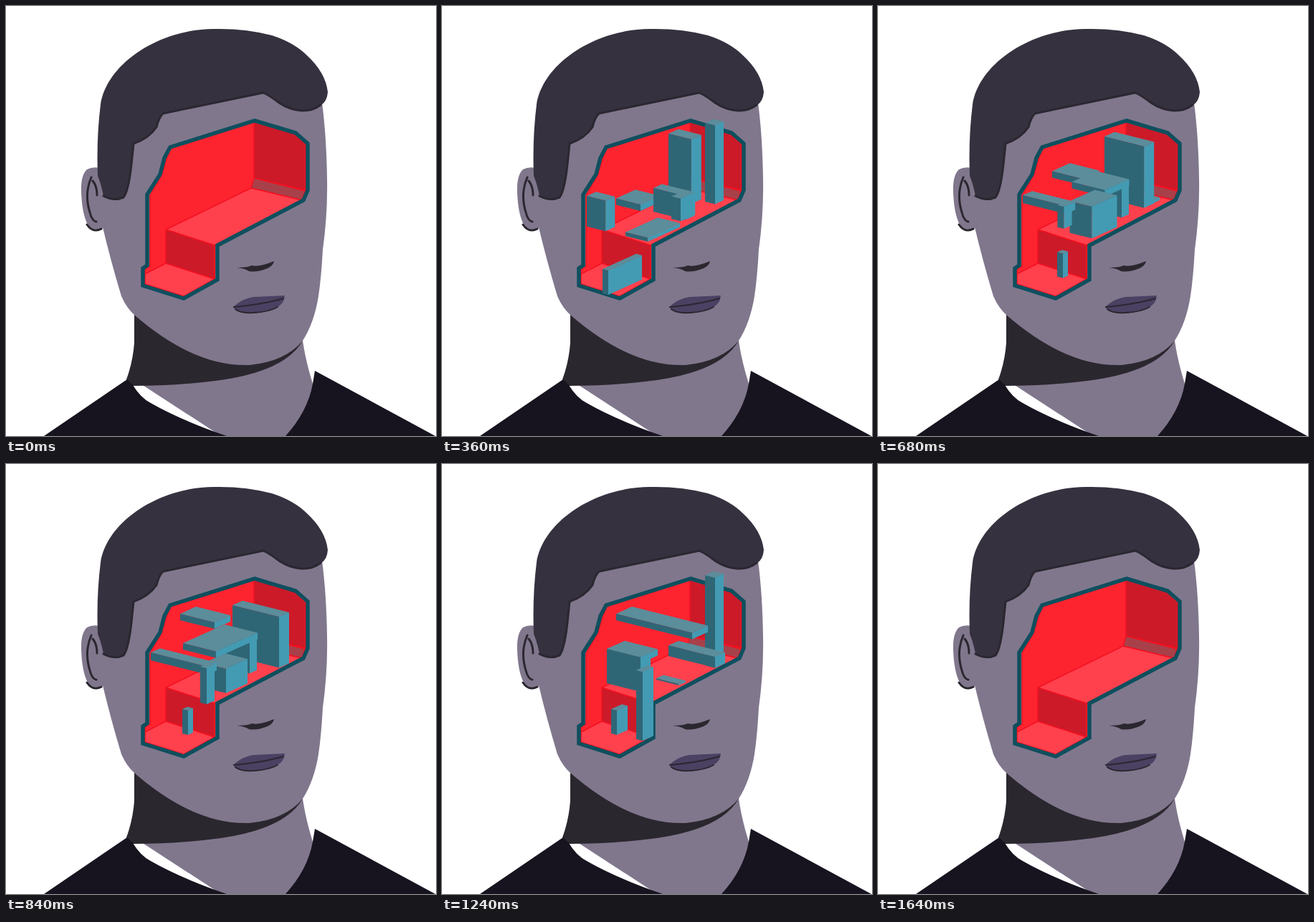
An HTML page for the animation above (1680 ms loop, 600 px wide and 600 px high).

```html
<!DOCTYPE html>
<html lang="en">
<head>
<meta charset="utf-8">
<title>Room in a head</title>
<style>
html, body { margin: 0; width: 100%; height: 100%; overflow: hidden; background: #fff }
svg { display: block; width: 100vw; height: 100vh }
.skin { fill: #80778d }
.dark { fill: #2b272e }
.shirt { fill: #17131f }
.line { fill: none; stroke: #2b2730; stroke-width: 3; stroke-linecap: round; stroke-linejoin: round }
.room { stroke: #f4101f; stroke-width: 1.5; stroke-linejoin: round }
</style>
</head>
<body>
<svg viewBox="0 0 600 600">
  <!-- neck and shirt -->
  <path class="skin" d="M190 430 414 467Q418 495 428 527L431 600H300L180 522Z"/>
  <path class="dark" d="M179 425V470Q177 497 168 521L177 530Q240 530 300 522Q390 509 414 467Z"/>
  <path class="shirt" d="M53 600 169 521 177 529Q188 547 202 554Q244 578 308 600Z"/>
  <path class="shirt" d="M390 600Q421 566 428 527L431 509 599 600Z"/>
  <!-- head -->
  <path class="skin" d="M135 227Q122 223 113 228Q104 236 105 260Q106 288 113 303Q121 316 135 310Z"/>
  <path class="line" d="M113 305Q121 317 133 311M119 239Q109 262 117 288Q120 300 126 301M121 244Q127 251 127 264"/>
  <path class="skin" d="M128 230 135 309Q146 355 161 405Q168 421 179 431Q263 504 340 501Q390 496 414 467Q430 442 436 405Q440 378 442 340Q449 290 448 240Q447 180 441 135L360 110 200 140Z"/>
  <path fill="#36313f" d="M128 237Q126 185 132 137C142 77 218 32 290 32Q334 31 371 41Q402 51 420 69Q446 93 449 120Q448 133 440 138Q427 148 412 147Q396 146 381 136Q368 126 359 121L219 150Q213 156 210 169Q199 185 178 192L175 221Q171 258 164 268Q150 274 136 265Q133 249 128 237Z"/>
  <path class="line" d="M439 138Q427 147 412 146Q396 145 381 135Q368 125 359 121L219 150Q213 156 210 169Q199 185 178 192L175 221Q171 258 164 267Q150 273 136 265"/>
  <path class="dark" d="M322 365Q338 365 343 362Q352 365 374 356Q373 362 365 366Q350 372 339 370Q333 366 322 365Z"/>
  <path fill="#4a4163" d="M317 420Q330 408 345 406L389 404Q388 416 378 420Q360 429 340 429Q322 428 317 420Z"/>
  <path class="line" style="stroke-width:2" d="M318 420Q360 416 387 408M320 423Q327 429 345 428Q367 427 379 420"/>
  <!-- room -->
  <g class="room">
    <path fill="#fd2430" d="M346 162 403 179 418 193V257L413 271 291 333V381L248 405 194 388V367L201 363V264L217 236 229 199Z"/>
    <path fill="#cc1a29" d="M346 162 403 179 418 193V257L346 240Z"/>
    <path fill="#a8404a" d="M346 240 417 258 413 271 342 254Z"/>
    <path fill="#ff404d" d="M223 312 342 254 413 271 291 334Z"/>
    <path fill="#cc1a29" d="M223 312 291 334V381L223 359Z"/>
    <path fill="#ff404d" d="M194 374 223 359 291 381 248 405 194 388Z"/>
  </g>
  <path fill="none" stroke="#0f4f5e" stroke-width="5.5" d="M347 160 404 177 421 192V257L415 271 295 334V382L248 408 191 390V366L197 362V263L215 235 221 212 229 197Z"/>
  <g id="boxes"></g>
</svg>
<script>
const LOOP = 1680;
const BEAT = 560;
const STEPS = [0, 80, 120, 160, 200, 240, 320, 400, 480];
const layer = document.getElementById('boxes');

// The motion is held on an uneven beat that repeats three times per loop.
function held(time) {
  if (time < 40) return 0;
  const beat = (time - 40) % BEAT;
  return time - beat + STEPS.findLast(step => step <= beat);
}

const face = (fill, ...points) => `<polygon fill="${fill}" points="${points.join(' ')}"/>`;

// x, y: left top corner; a: depth down-right; b: width up-right; h: height.
function box(x, y, a, b, h) {
  if (h < 0.5) return '';
  const at = (i, j, down) => [x + a * i + b * j, y + a * i * 0.25 - b * j * 0.45 + h * down];
  return face('#5b8d9b', at(0, 0, 0), at(1, 0, 0), at(1, 1, 0), at(0, 1, 0)) +
    face('#2f6676', at(0, 0, 0), at(1, 0, 0), at(1, 0, 1), at(0, 0, 1)) +
    face('#439bb3', at(1, 0, 0), at(1, 1, 0), at(1, 1, 1), at(1, 0, 1));
}

const standing = (x, foot, a, b, h) => box(x, foot - h, a, b, h);

function scene(t) {
  const ramp = (start, end, power = 1) =>
    Math.min(1, Math.max(0, (t - start) / (end - start))) ** power;
  const pop = ramp(0, 120);
  const early = ramp(120, 520);
  const middle = ramp(520, 840);
  const late = ramp(840, 1240);
  const stay = 1 - ramp(1240, 1640);
  const gone = 1 - stay;
  const pulse = Math.sin(2 * Math.PI * t / LOOP) ** 6;
  const swell = Math.sin(Math.PI * ramp(120, 600)) ** 3;

  const pillar = standing(367, 273 + 8 * late, 14, 12, 128 * pulse * stay);
  const tower = standing(316, 268, 65 * ramp(120, 840, 0.65), 14,
    (90 * pop - 75 * ramp(600, 1240, 1.4)) * stay);
  const bar = box(243 + 106 * gone, 298 - 89 * ramp(0, 840, 1.3) + 26 * gone,
    (34 + 14 * middle + 58 * late) * stay, 27 - 5 * middle, 9 * pop * stay);
  const wall = standing(295 + 4 * late, 287 - 6 * middle + 20 * late, 45 - 14 * late,
    15 - 5 * early, (46 * ramp(0, 500) - 44 * late) * stay);
  const arm = standing(296 + 40 * early, 312 - 25 * early, 13, 43 - 38 * early,
    early < 1 ? 9 * pop + 37 * early : 0);
  const table = box(294 - 47 * middle - 17 * late, 241 + 9 * middle + 8 * late + 48 * gone,
    46, 10 + 48 * middle - 33 * late, 9 * ramp(520, 560) * stay);
  const block = standing(252 + 7 * early + 17 * middle, 321 - 9 * middle, 31,
    45 - 15 * ramp(360, 840), 49 * (ramp(280, 520, 2) - ramp(520, 1200, 1.6)));
  const body = standing(230, 306, 47, 14, 48 * late * stay);
  const shelf = box(202 + 69 * late, 356 - 91 * pop - 2 * middle + 25 * late,
    7 + 72 * ramp(120, 840, 1.2) - 71 * late, 13, (90 * pop - 79 * early) * stay);
  const legHeight = 11 * ramp(520, 560) + 39 * middle + 46 * late;
  const leg = standing(230 + 41 * middle, 284 + 49 * middle + 51 * late, 9, 11 + 4 * late,
    legHeight * stay);
  const stool = standing(264 - 28 * ramp(120, 1240) - 34 * swell, 379 - 3 * middle + 22 * swell,
    8, 7 + 40 * swell + 8 * late, 34 * pop * stay);

  return pillar + tower + bar + wall + arm + table + block + body + shelf + leg + stool;
}

function draw() {
  layer.innerHTML = scene(held(performance.now() % LOOP));
  requestAnimationFrame(draw);
}
draw();
</script>
</body>
</html>
```
